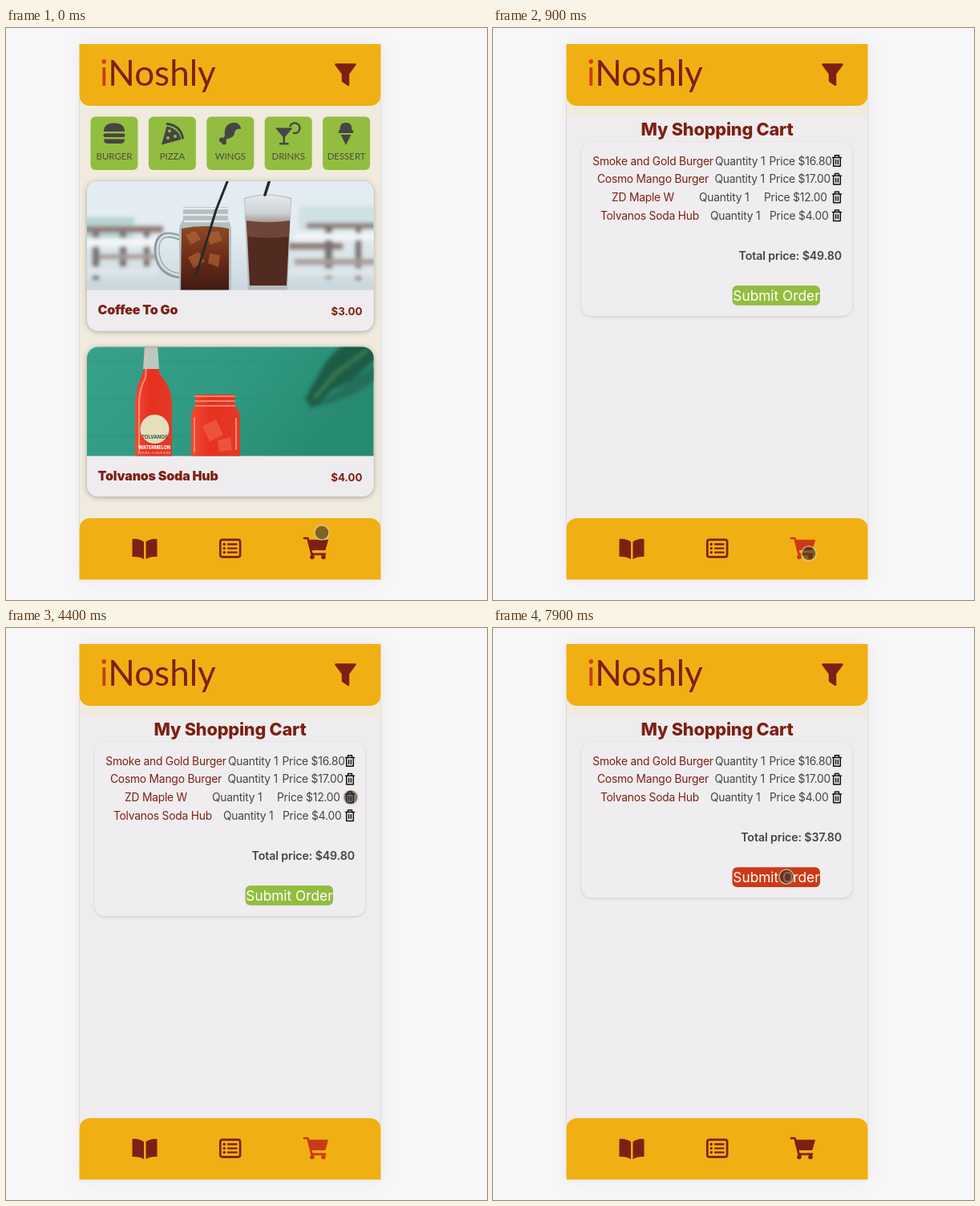
An HTML page for the animation above (8000 ms loop, 600 px wide and 713 px high).

```html
<!DOCTYPE html>
<html lang="en">
<head>
<meta charset="utf-8">
<title>Food ordering app</title>
<style>
html, body { margin: 0; width: 100%; height: 100%; overflow: hidden; background: #f7f6f8; }
svg { display: block; width: 600px; height: 713px; font-family: Inter, "Open Sans", sans-serif; }
.brown { fill: #7d2012; }
.body { font-size: 13.8px; letter-spacing: -.2px; fill: #444; }
.body .brown { fill: #7d2012; }
.label { font: 400 11.4px Lato, sans-serif; fill: #4b4d42; text-anchor: middle; }
.dish { font-size: 16px; font-weight: 900; letter-spacing: -.2px; }
.price { font-size: 13.3px; font-weight: 700; text-anchor: end; }
.mid { text-anchor: middle; }
.line { fill: none; stroke-linecap: round; stroke-linejoin: round; }
</style>
</head>
<body>
<svg viewBox="0 0 600 713" xmlns="http://www.w3.org/2000/svg">
  <defs>
    <filter id="glow" x="-20%" y="-20%" width="140%" height="140%">
      <feDropShadow dx="0" dy="0" stdDeviation="9" flood-color="#777" flood-opacity=".13"/>
    </filter>
    <filter id="lift" x="-10%" y="-10%" width="120%" height="125%">
      <feDropShadow dx="0" dy="1" stdDeviation="3.2" flood-color="#444" flood-opacity=".46"/>
    </filter>
    <filter id="soft" x="-10%" y="-10%" width="120%" height="125%">
      <feDropShadow dx="0" dy="1" stdDeviation="1.8" flood-color="#555" flood-opacity=".25"/>
    </filter>
    <filter id="blur" x="-30%" y="-30%" width="160%" height="160%"><feGaussianBlur stdDeviation="2.6"/></filter>
    <linearGradient id="sky" x2="0" y2="1">
      <stop stop-color="#e4ebf4"/><stop offset=".45" stop-color="#e3edf1"/><stop offset="1" stop-color="#ccd8de"/>
    </linearGradient>
    <linearGradient id="wall" x2="1" y2=".3">
      <stop stop-color="#38a18a"/><stop offset=".6" stop-color="#2f9880"/><stop offset="1" stop-color="#278a72"/>
    </linearGradient>
    <linearGradient id="cola" x2="0" y2="1">
      <stop stop-color="#8c4a24"/><stop offset=".5" stop-color="#6b2c18"/><stop offset="1" stop-color="#3f1a14"/>
    </linearGradient>
    <linearGradient id="foam" x2="0" y2="1">
      <stop stop-color="#e6e9eb"/><stop offset=".65" stop-color="#ced3d6"/><stop offset="1" stop-color="#a89b97"/>
    </linearGradient>
    <linearGradient id="soda" x2="1" y2="0">
      <stop stop-color="#ee4a35"/><stop offset=".4" stop-color="#e8301f"/><stop offset="1" stop-color="#e23a28"/>
    </linearGradient>
    <clipPath id="top1"><path d="M101 326.500V205a14 14 0 0 1 14-14H444.500a14 14 0 0 1 14 14V326.500Z"/></clipPath>
    <clipPath id="top2"><path d="M101 533.500V411.500a14 14 0 0 1 14-14H444.500a14 14 0 0 1 14 14V533.500Z"/></clipPath>
  </defs>

  <rect width="600" height="713" fill="#f7f6f8"/>
  <rect x="91.500" y="20" width="376" height="667.500" fill="#f0ebde" filter="url(#glow)"/>

  <g id="menu">
    <g id="chips"></g>

    <rect x="101" y="191" width="357.500" height="186.500" rx="14" fill="#efecf0" filter="url(#lift)"/>
    <g clip-path="url(#top1)">
      <rect x="101" y="191" width="358" height="136" fill="url(#sky)"/>
      <g filter="url(#blur)">
        <path d="M96 236H160V272H96Z" fill="#b9d3d4"/>
        <path d="M365 222H465V252H365Z" fill="#cfe2e3"/>
        <path d="M96 247H196V255H96ZM375 243H465V250H375ZM352 268H420V276H352Z" fill="#8e7a74"/>
        <path d="M108 254H116V314H108ZM142 254H150V306H142ZM172 254H179V300H172ZM398 248H407V312H398ZM436 248H443V314H436Z" fill="#77706f"/>
        <path d="M96 262H190V272H96ZM360 256H465V264H360Z" fill="#f3f6f8"/>
        <path d="M116 282H190V288H116ZM360 288H465V295H360Z" fill="#a79b97"/>
        <path d="M96 298H190V308H96ZM352 300H465V309H352Z" fill="#dfe6ea"/>
      </g>
      <path d="M101 318H459V327H101Z" fill="#cbd8df"/>
      <path class="line" d="M216 261Q187 250 188 279Q190 305 216 309" stroke="#8e9da3" stroke-width="7"/>
      <path class="line" d="M216 261Q188 251 189 279Q191 304 216 308" stroke="#d5dfe2" stroke-width="3"/>
      <path d="M221 223H277V240Q281 244 281 253V327H216V253Q216 244 221 240Z" fill="#b3bfc0"/>
      <path d="M219 250Q248 244 278 250V327H218Z" fill="url(#cola)"/>
      <path d="M224 258l12-5 7 10-12 7ZM249 256l16-3 5 12-15 5ZM227 286l13-7 8 12-14 8ZM254 281l13 2-2 15-13-5Z" fill="#b8693a" opacity=".6"/>
      <path class="line" d="M221 225H277M221 233H277M223 241H276" stroke="#e4eaeb" stroke-width="2.500"/>
      <path class="line" d="M277 189L262 227L237 309" stroke="#27282b" stroke-width="3"/>
      <path d="M297 212Q326 203 356 212L351 327H302Z" fill="#b4bbbf"/>
      <path d="M300 239Q327 236 354 239L350 321H304Z" fill="#512a20"/>
      <path d="M300 239Q327 236 354 239L353 260Q327 263 301 260Z" fill="#704539"/>
      <path d="M298 213Q326 204 355 213L354 240Q327 244 299 240Z" fill="url(#foam)"/>
      <path class="line" d="M323 208L329 189" stroke="#27282b" stroke-width="3.500"/>
    </g>
    <text class="brown dish" x="114.500" y="357">Coffee To Go</text>
    <text class="brown price" x="444.500" y="357.500">$3.00</text>

    <rect x="101" y="397.500" width="357.500" height="186.500" rx="14" fill="#efecf0" filter="url(#lift)"/>
    <g clip-path="url(#top2)">
      <rect x="101" y="397" width="358" height="137" fill="url(#wall)"/>
      <path d="M101 416H459M101 462H459M101 508H459" stroke="#288871" opacity=".4"/>
      <g filter="url(#blur)" fill="#1d5b45">
        <path d="M462 394H422Q402 408 390 432L373 462L381 474L392 468L406 452L430 440L462 412Z"/>
        <path d="M462 420L436 436L400 462L386 473L404 468L436 456L462 438Z" fill="#24705a"/>
        <path class="line" d="M450 402L412 430L386 460" stroke="#3f7f55" stroke-width="4"/>
      </g>
      <path d="M173 395H189L191 430Q206 447 207 466V534H161V466Q162 447 171 430Z" fill="url(#soda)"/>
      <path d="M173 395H189L191 425H171Z" fill="#b9c9bf"/>
      <path class="line" d="M176 400L174 436Q166 450 166 468V528" stroke="#f7b5a5" stroke-width="2" opacity=".65"/>
      <circle cx="185.500" cy="500" r="18" fill="#e6dfbd"/>
      <text class="mid" x="185.500" y="512" font-size="6" font-weight="700" fill="#36523a">TOLVANOS</text>
      <text class="mid" x="185" y="525" font-size="5.500" font-weight="800" fill="#fff">WATERMELON</text>
      <text class="mid" x="185" y="531" font-size="3.500" fill="#f7d5cc">NATURAL FLAVOR SODA</text>
      <path d="M236 457H285V471Q292 476 292 486V534H231V486Q231 476 236 471Z" fill="url(#soda)"/>
      <path class="line" d="M236 459H285M236 465H285M237 471H285" stroke="#f0846a" stroke-width="2"/>
      <path d="M245 496l17-8 9 19-17 9ZM264 514l16-4 2 16-16 2Z" fill="#f2664f" opacity=".6"/>
      <path class="line" d="M235 486V528M287 487V525" stroke="#f58771" stroke-width="2"/>
    </g>
    <text class="brown dish" x="114.500" y="564">Tolvanos Soda Hub</text>
    <text class="brown price" x="444.500" y="564.500">$4.00</text>
  </g>

  <g id="basket">
    <rect x="92" y="110" width="375" height="520" fill="#eeecef"/>
    <text class="brown mid" x="279.500" y="133.500" font-size="21.700" font-weight="800" letter-spacing="-.2">My Shopping Cart</text>
    <rect id="panel" x="110.500" y="142" width="337.500" rx="13" fill="#efedf0" filter="url(#soft)"/>
    <g id="rows"></g>
    <g id="sum">
      <text id="total" x="435" y="289" text-anchor="end" font-size="14.200" font-weight="600" letter-spacing="-.1" fill="#444"></text>
      <rect id="submit" x="298.500" y="321" width="109.500" height="24.700" rx="6"/>
      <text class="mid" x="353.500" y="339.500" font-size="17.300" fill="#fff">Submit Order</text>
    </g>
  </g>

  <path d="M91.500 20H467.500V84a13 13 0 0 1-13 13H104.500a13 13 0 0 1-13-13Z" fill="#f0b013"/>
  <path d="M91.500 687.500H467.500V624a13 13 0 0 0-13-13H104.500a13 13 0 0 0-13 13Z" fill="#f0b013"/>
  <path d="M91.500 88V620M467.500 88V620" stroke="#dedbd5"/>
  <text class="brown" x="117" y="72" style="font:400 44px Lato, sans-serif"><tspan fill="#cc3f14">i</tspan>Noshly</text>
  <path class="brown" d="M411.500 45.500H435.500L427 57V71L420 66V57Z" stroke="#7d2012" stroke-width="2.500" stroke-linejoin="round"/>

  <g class="brown">
    <path d="M172 640.500Q165.500 636 157.500 637V659Q166 658.500 172 662ZM174.500 640.500Q181 636 188.500 637V659Q180 658.500 174.500 662Z"/>
    <rect x="267.300" y="637.800" width="24.800" height="21.500" rx="2.500" fill="none" stroke="#7d2012" stroke-width="2.700"/>
    <path class="line" d="M277 643.500H287.500M277 648.600H287.500M277 653.700H287.500" stroke="#7d2012" stroke-width="2.300"/>
    <path class="line" d="M272.200 643.500h.1M272.200 648.600h.1M272.200 653.700h.1" stroke="#7d2012" stroke-width="3.300"/>
  </g>
  <g id="cart">
    <path d="M377 638.300H401.500L398 650.500H380.500Z"/>
    <path class="line" d="M372 636H376.500L381.500 655.800H398" stroke-width="2.700"/>
    <circle cx="382" cy="659.500" r="2.800" stroke="none"/><circle cx="396" cy="659.500" r="2.800" stroke="none"/>
  </g>

  <circle id="touch" r="9" fill="#2b2a26" fill-opacity=".58" stroke="#e3d6ae" stroke-opacity=".7" stroke-width="1.500"/>
  <path id="arrow" d="M0 0V13.500L3.200 10.600L5.400 15.600L7.800 14.600L5.600 9.700H10Z" fill="#111" stroke="#fff" stroke-width=".9"/>
</svg>
<script>
const LOOP = 8000, OPEN = 900, REMOVE = 5900, SEND = 7900;
const BROWN = '#7d2012', RED = '#cb3a16', GREEN = '#93bd40', ROW = 22.7;
const $ = id => document.getElementById(id);

const icons = [
  ['BURGER', `<path d="M122 129q0-10.500 13-10.500t13 10.500ZM122 138.500h26q0 5.500-5 5.500h-16q-5 0-5-5.500Z"/>
    <rect x="121.500" y="131.500" width="27" height="4.500" rx="2.200"/>`],
  ['PIZZA', `<path d="M194 145.500L200.500 122.500Q216 126 218.500 139Z"/>
    <path class="line" d="M201 119.500Q217.500 121.500 220.500 137" stroke="#454545" stroke-width="3"/>
    <g fill="${GREEN}"><circle cx="204" cy="128.500" r="2"/><circle cx="211" cy="135" r="2"/><circle cx="202" cy="137" r="2"/></g>`],
  ['WINGS', `<path d="M273 135Q271 120 283 118Q292 117 293 126Q286 125 285 131Q285 136 277 138Z"/>
    <path class="line" d="M276 135L270 141" stroke="#454545" stroke-width="4.500"/>
    <circle cx="269" cy="139.500" r="3"/><circle cx="272" cy="142.500" r="3"/>`],
  ['DRINKS', `<path d="M336 124.500H357.500L348 136V143H352.500V145.500H341V143H345.500V136Z"/>
    <path class="line" d="M354.500 122A6.300 6.300 0 1 1 359 131" stroke="#454545" stroke-width="2.500"/>`],
  ['DESSERT', `<path d="M416.500 127Q416 118 424 118T431.500 127Q434 128 433 131H415Q414 128 416.500 127Z"/>
    <path d="M417.500 133H430.500L424 146Z"/>`]
];
$('chips').innerHTML = icons.map(([name, art], i) => {
  const x = 105.5 + 72.4 * i;
  return `<rect x="${x}" y="110.500" width="59" height="66.500" rx="6" fill="${GREEN}"/>
    <g fill="#454545">${art}</g><text class="label" x="${x + 29.5}" y="164">${name}</text>`;
}).join('');

// name, name centre, quantity x, price x, price
const items = [
  ['Smoke and Gold Burger', 199.5, 277, 344.5, 16.8],
  ['Cosmo Mango Burger', 199.5, 276.5, 344.5, 17],
  ['ZD Maple W', 187, 257, 338, 12],
  ['Tolvanos Soda Hub', 195.5, 271, 345, 4]
];
const money = n => '$' + n.toFixed(2);
const bin = `<path class="line" d="M423.500 161.500H434.500M426.500 161V158.800H431.500V161M424.700 162V172.300H433.300V162M427.600 164.500V169.500M430.400 164.500V169.500" stroke="#111" stroke-width="1.500"/>`;
$('rows').innerHTML = items.map(([name, mid, qx, px, cost]) =>
  `<g class="body"><text class="brown mid" x="${mid}" y="170.500">${name}</text>
    <text x="${qx}" y="170.500">Quantity 1</text><text x="${px}" y="170.500">Price ${money(cost)}</text>${bin}</g>`).join('');
const rows = [...$('rows').children];

// time, x, y
const path = [
  [0, 394, 629], [100, 394, 629], [550, 394, 655], [1500, 394, 655], [2200, 460, 345],
  [2650, 492.5, 221], [2900, 492.5, 221], [3800, 430, 211], [6000, 430, 211], [7100, 366, 310], [LOOP, 366, 310]
];
function pointer(t) {
  const i = path.findIndex((p, k) => k && t <= p[0]);
  const [t0, x0, y0] = path[i - 1], [t1, x1, y1] = path[i];
  const u = (t - t0) / (t1 - t0), e = u * u * (3 - 2 * u);
  return [x0 + (x1 - x0) * e, y0 + (y1 - y0) * e];
}
const show = (el, on) => el.setAttribute('display', on ? 'inline' : 'none');
const move = (el, x, y) => el.setAttribute('transform', `translate(${x} ${y})`);

function render(t) {
  const removed = t >= REMOVE, shift = removed ? -ROW : 0;
  show($('menu'), t < OPEN);
  show($('basket'), t >= OPEN);
  rows.forEach((row, i) => {
    show(row, !(removed && i === 2));
    move(row, 0, i * ROW + (i > 2 ? shift : 0));
  });
  $('panel').setAttribute('height', 217 + shift);
  move($('sum'), 0, shift);
  const total = items.reduce((sum, item, i) => sum + (removed && i === 2 ? 0 : item[4]), 0);
  $('total').textContent = 'Total price: ' + money(total);
  $('submit').setAttribute('fill', t >= SEND ? RED : GREEN);

  const tint = t >= OPEN && !removed ? RED : BROWN;
  $('cart').setAttribute('fill', tint);
  $('cart').setAttribute('stroke', tint);

  const [x, y] = pointer(t), inside = x < 468;
  show($('touch'), inside);
  show($('arrow'), !inside);
  move($('touch'), x, y);
  move($('arrow'), x, y);
}

const start = performance.now();
function tick() {
  render((performance.now() - start) % LOOP);
  requestAnimationFrame(tick);
}
tick();
</script>
</body>
</html>
```
